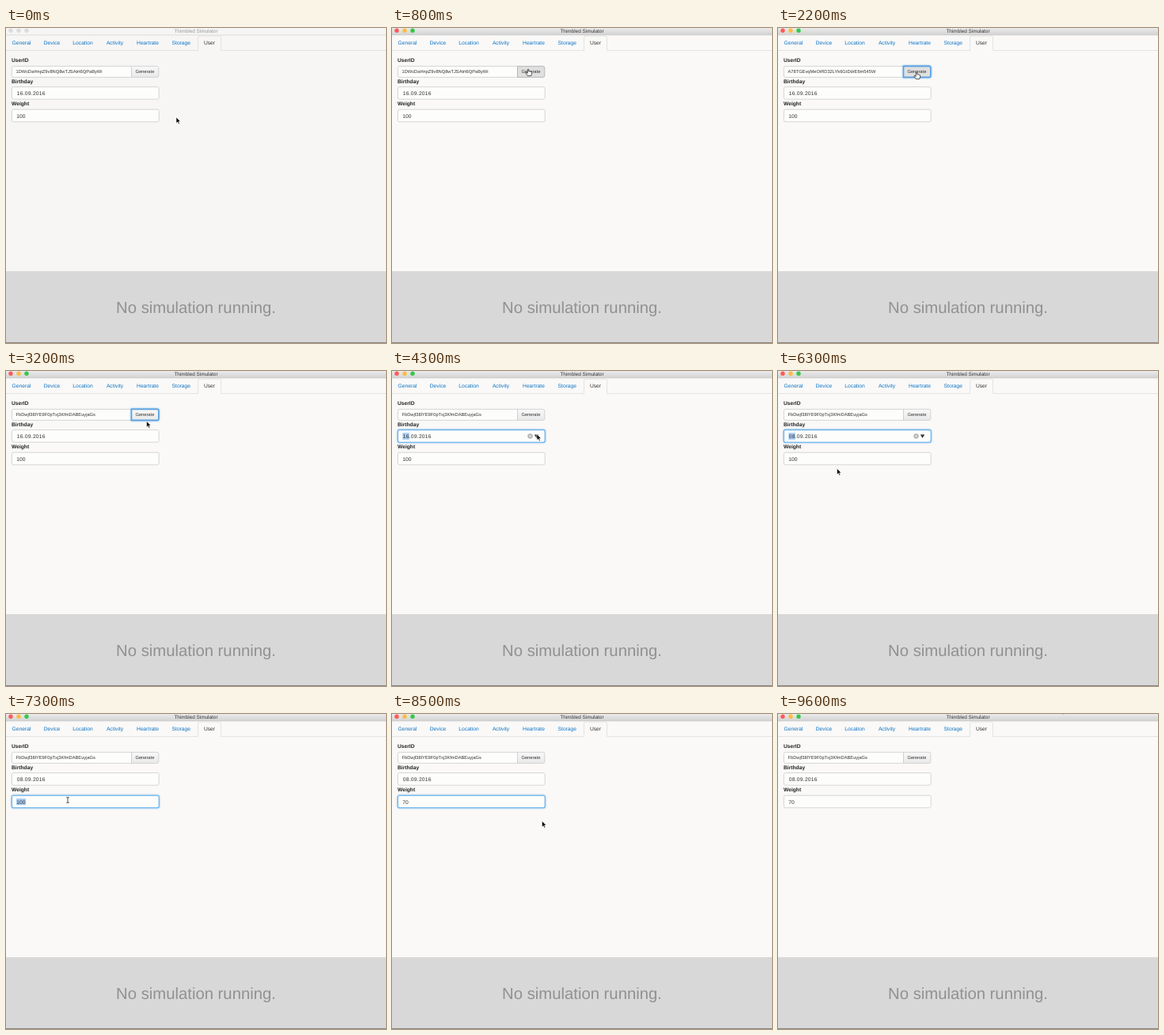
Animation, 480 px wide and 399 px high, one loop 9700 ms. Source, as an HTML page:

```html
<!DOCTYPE html>
<html lang="en">
<head>
<meta charset="utf-8">
<title>Thimbled Simulator</title>
<style>
  html, body { margin: 0; width: 100%; height: 100%; overflow: hidden; background: #faf9f8; }
  svg { display: block; width: 480px; height: 399px; }
  text { font: 6.7px "Liberation Sans", Arial, sans-serif; fill: #333; text-rendering: geometricPrecision; }
  .mid { text-anchor: middle; }
  .bold { font-weight: bold; fill: #222; }
  .small { font-size: 5.73px; }
  .tab { fill: #0b72c4; }
  .field { fill: #fdfdfc; stroke: #ccc; stroke-width: .8; }
  .focus { stroke: #66afe9; stroke-width: 1.1; filter: drop-shadow(0 0 1.2px #66afe9); }
  .day { font-size: 6.1px; text-anchor: middle; fill: #222; }
  .out { fill: #bbb; }
  .selection { fill: #a9cdf5; }
</style>
</head>
<body>
<svg viewBox="0 0 480 399">
  <defs>
    <linearGradient id="metal" x2="0" y2="1">
      <stop stop-color="#ebebeb"/><stop offset="1" stop-color="#d2d2d2"/>
    </linearGradient>
    <linearGradient id="raised" x2="0" y2="1">
      <stop stop-color="#f8f8f8"/><stop offset="1" stop-color="#e9e9e9"/>
    </linearGradient>
  </defs>

  <rect id="page" width="480" height="399"/>
  <rect id="titleBar" width="480" height="9"/>
  <path d="M0 8.9H480" stroke="#c4c4c4" stroke-width=".5"/>
  <g id="lights"></g>
  <text id="title" class="mid" x="240" y="5.6" style="font-size:6.4px">Thimbled Simulator</text>

  <path d="M0 28.5H242.5V12Q242.5 10 244.5 10H269.5Q271.5 10 271.5 12V28.5H480" fill="none" stroke="#ddd" stroke-width=".8"/>
  <g id="tabs"></g>

  <text class="bold" x="7" y="43.3">UserID</text>
  <path class="field" d="M158.5 48.4H9.5Q7.4 48.4 7.4 50.5V60.3Q7.4 62.4 9.5 62.4H158.5Z"/>
  <text id="userId" class="small" x="12.5" y="57.3"></text>
  <path id="button" d="M158.5 48.4H190.8Q192.8 48.4 192.8 50.4V60.4Q192.8 62.4 190.8 62.4H158.5Z" stroke-width=".8"/>
  <text class="small mid" x="175.4" y="57.3">Generate</text>

  <text class="bold" x="7" y="69.7">Birthday</text>
  <rect id="birthday" x="7.4" y="74.6" width="185.8" height="15.6" rx="2"/>
  <rect id="daySelection" class="selection" x="13.3" y="78.3" width="8.6" height="8.6"/>
  <text id="date" x="13.8" y="85" letter-spacing=".25"></text>
  <g id="dateTools">
    <circle cx="174.5" cy="82.5" r="3.2" fill="#b5b5b5"/>
    <path d="M173.2 81.2L175.8 83.8M175.8 81.2L173.2 83.8" stroke="#fff" stroke-width=".8"/>
    <path d="M179.8 80.6H185.2L182.5 85Z" fill="#333"/>
  </g>

  <text class="bold" x="7" y="98.2">Weight</text>
  <rect id="weight" x="7.4" y="103.2" width="185.8" height="15.6" rx="2"/>
  <rect id="weightSelection" class="selection" x="13" y="107" width="12" height="8.3"/>
  <text id="kilos" x="13.3" y="113.5"></text>

  <g id="calendar">
    <rect x="7.5" y="91.3" width="125.6" height="87" fill="#fbfaf9" stroke="#c6c6c6" stroke-width=".7" style="filter:drop-shadow(0 1px 1.2px #0003)"/>
    <text x="15" y="104.3" style="font-size:6.1px">September 2016</text>
    <path d="M62.7 100.8H67.3L65 104Z" fill="#333"/>
    <g fill="url(#raised)" stroke="#b5b5b5" stroke-width=".7">
      <rect x="90" y="96.3" width="11" height="11.4"/>
      <rect x="103.4" y="96.3" width="11" height="11.4"/>
      <rect x="116.6" y="96.3" width="11" height="11.4"/>
    </g>
    <path d="M96.6 100.4V103.6L94.6 102ZM121.2 100.4V103.6L123.2 102Z" fill="#333"/>
    <circle cx="108.9" cy="102" r="1.5" fill="#333"/>
    <rect x="12.8" y="113.3" width="115" height="60.2" fill="#fefefe"/>
    <rect x="12.8" y="113.3" width="115" height="10.8" fill="#ebebeb"/>
    <rect id="hovered" width="16.4" height="9.7" fill="#b5cbea"/>
    <rect x="45.7" y="153.8" width="15.9" height="9.6" fill="none" stroke="#bbb" stroke-width=".7"/>
    <g id="days"></g>
    <rect x="12.8" y="113.3" width="115" height="60.2" fill="none" stroke="#8fbce6" stroke-width=".9"/>
  </g>

  <rect y="308" width="480" height="91" fill="#d8d8d8"/>
  <text class="mid" x="240" y="360.6" style="font-size:20.3px;fill:#919191">No simulation running.</text>
  <path d="M0 398.5H480" stroke="#858585"/>

  <g id="arrow"><path d="M0 0V7.6L1.8 6L3 8.8L4.3 8.2L3.1 5.5H5.4Z" fill="#000" stroke="#fff" stroke-width=".6"/></g>
  <g id="hand"><path d="M-.8 .6Q0-.5 .8 .6V3Q1.5 2.4 2.1 3.2Q2.9 2.6 3.4 3.5Q4.3 3.1 4.6 4.2V6L3.7 8.6H-.7L-3 5.3Q-3.2 4.2-2.2 4.4L-.8 5.4Z" fill="#fff" stroke="#111" stroke-width=".7"/></g>
  <g id="beam"><path d="M-1.7-3.6Q0-3.6 0-2.6Q0-3.6 1.7-3.6M0-2.8V2.8M-1.7 3.6Q0 3.6 0 2.6Q0 3.6 1.7 3.6" fill="none" stroke="#222" stroke-width=".8"/></g>
</svg>

<script>
const LOOP = 9700, STEP = 100;
const ACTIVATE = 700, FIRST_ID = 1300, SECOND_ID = 2800, PICK_DATE = 3900, OPEN = 4600,
      CLOSE = 5800, PICK_WEIGHT = 6900, TYPE_7 = 7800, TYPE_0 = 8100, BLUR = 8900;
const IDS = ["1DWcDaHnpZ9v8NQ8wTJSAtrt6QPaByWi", "A78TGEvqMeOiRD32LYk6GtDdrE6m545W", "FbDwjf38lYE9F0pTxj3KfmDABEuyjaGs"];

// Pointer path: time, x, y
const PATH = [
  [0, 215, 113], [700, 172, 52], [1000, 172, 52], [1400, 175, 56], [2900, 175, 56],
  [3700, 183, 80], [4700, 183, 80], [5300, 71, 138], [5900, 71, 138], [6700, 78, 109],
  [8200, 78, 109], [8700, 250, 150], [9100, 250, 150], [9600, 357, -8]
];

const $ = id => document.getElementById(id);
const show = (id, on) => $(id).setAttribute("display", on ? "inline" : "none");
const set = (id, name, value) => $(id).setAttribute(name, value);
const label = (text, x, y, cls) => `<text class="${cls}" x="${x}" y="${y}">${text}</text>`;

const tabs = { General: 19.5, Device: 58, Location: 97, Activity: 137.5, Heartrate: 179, Storage: 221.3, User: 257 };
$("tabs").innerHTML = Object.entries(tabs)
  .map(([name, x]) => label(name, x, 21.3, name === "User" ? "mid" : "mid tab")).join("");

$("lights").innerHTML = [6, 16, 26].map(x => `<circle cx="${x}" cy="3.2" r="2.7"/>`).join("");

const columnX = col => 21 + col * 16.4;
let cells = ["Mo.", "Di.", "Mi.", "Do.", "Fr.", "Sa.", "So."].map((d, i) => label(d, columnX(i), 121.3, "day")).join("");
for (let i = 0; i < 35; i++) {
  const day = i < 3 ? 29 + i : (i - 3) % 30 + 1;
  cells += label(day, columnX(i % 7), 131.8 + Math.floor(i / 7) * 9.6, i < 3 || i > 32 ? "day out" : "day");
}
$("days").innerHTML = cells;

function pointerAt(t) {
  const i = PATH.findIndex(p => p[0] > t);
  if (i < 0) return PATH.at(-1).slice(1);
  const [t0, x0, y0] = PATH[i - 1], [t1, x1, y1] = PATH[i];
  const u = (t - t0) / (t1 - t0), k = u * u * (3 - 2 * u);
  return [x0 + (x1 - x0) * k, y0 + (y1 - y0) * k];
}

function draw(t) {
  const [x, y] = pointerAt(t);
  const over = (left, top, right, bottom) => x >= left && x <= right && y >= top && y <= bottom;
  const active = t >= ACTIVATE;
  const open = t >= OPEN && t < CLOSE;
  const dateFocus = t >= PICK_DATE && t < PICK_WEIGHT;
  const weightFocus = t >= PICK_WEIGHT && t < BLUR;
  const buttonFocus = t >= FIRST_ID && t < PICK_DATE;
  const onButton = over(158, 48, 193, 62.5);
  const onDate = over(7, 74, 193, 90);
  const onText = !open && (over(7, 48, 158, 62.5) || over(7, 103, 193, 119));

  set("page", "fill", active ? "#faf9f8" : "#f7f6f5");
  set("titleBar", "fill", active ? "url(#metal)" : "#f5f5f5");
  $("title").style.fill = active ? "#333" : "#999";
  ["#fc5b57", "#fdbc40", "#34c84a"].forEach((color, i) =>
    $("lights").children[i].setAttribute("fill", active ? color : "#dcdcdc"));

  $("userId").textContent = IDS[(t >= FIRST_ID) + (t >= SECOND_ID)];
  set("button", "fill", onButton ? "#dfdfdf" : "url(#raised)");
  set("button", "stroke", onButton ? "#adadad" : "#ccc");
  set("button", "class", buttonFocus ? "focus" : "");
  $("button").style.stroke = buttonFocus ? "#5b9fe0" : "";
  $("button").style.strokeWidth = buttonFocus ? "1.6" : "";

  set("birthday", "class", dateFocus ? "field focus" : "field");
  $("date").textContent = (t >= CLOSE ? "08" : "16") + ".09.2016";
  show("daySelection", dateFocus);
  show("dateTools", dateFocus || onDate);

  set("weight", "class", weightFocus ? "field focus" : "field");
  $("kilos").textContent = t < TYPE_7 ? "100" : t < TYPE_0 ? "7" : "70";
  show("weightSelection", weightFocus && t < TYPE_7);

  show("calendar", open);
  const inGrid = over(12.8, 124.4, 127.6, 173);
  const col = inGrid ? Math.floor((x - 12.8) / 16.4) : 4;
  const row = inGrid ? Math.floor((y - 124.8) / 9.7) : 2;
  set("hovered", "x", 12.8 + col * 16.4);
  set("hovered", "y", 124.9 + row * 9.6);

  const cursor = onButton ? "hand" : onText ? "beam" : "arrow";
  for (const name of ["arrow", "hand", "beam"]) show(name, name === cursor);
  set(cursor, "transform", `translate(${x} ${y})`);
}

function tick() {
  draw(Math.floor(performance.now() % LOOP / STEP) * STEP);
  requestAnimationFrame(tick);
}
tick();
</script>
</body>
</html>
```
